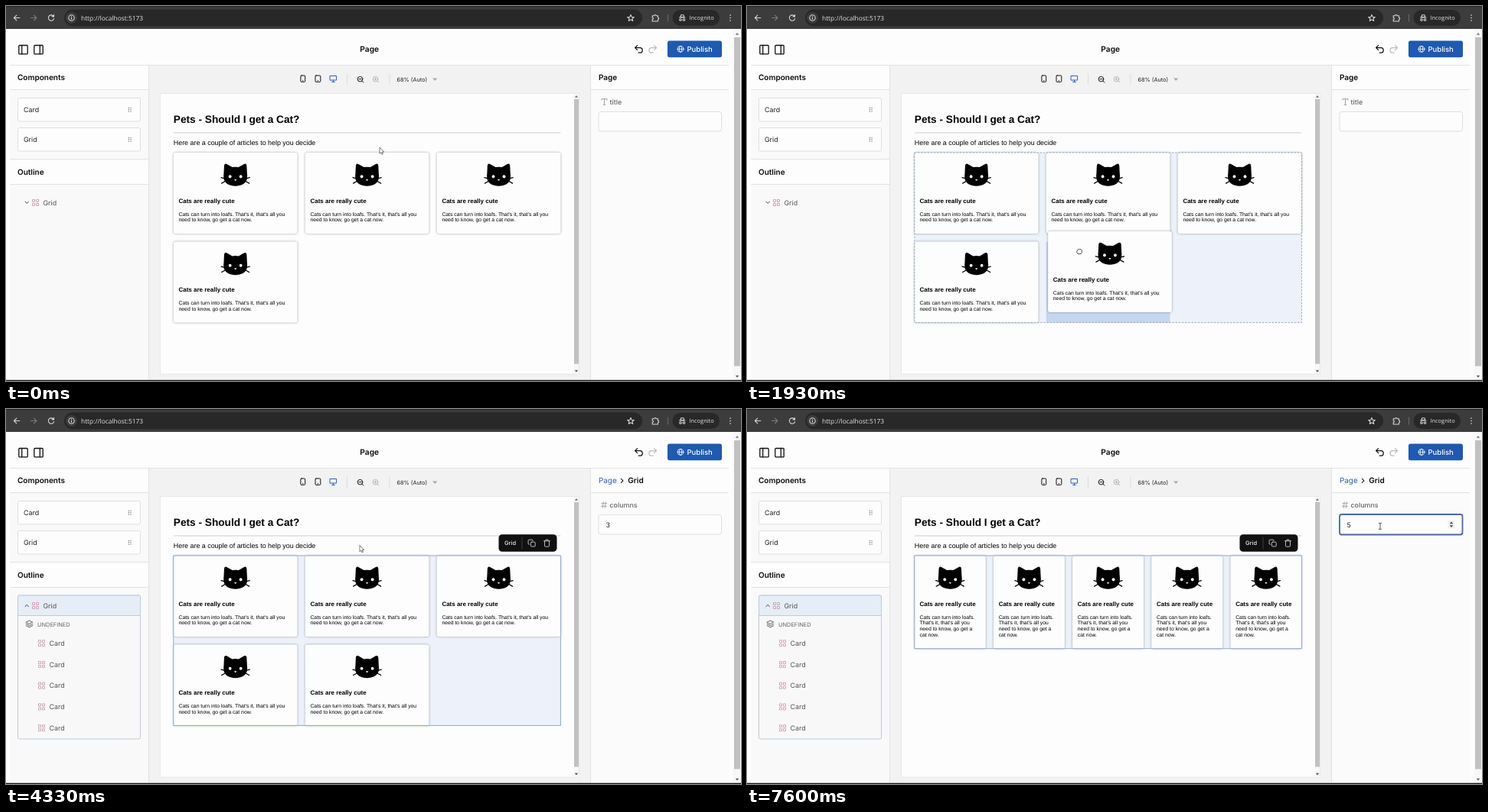
An HTML page for the animation above (7670 ms loop, 960 px wide and 491 px high).

```html
<!DOCTYPE html>
<html lang="en">
<head>
<meta charset="utf-8">
<title>Page editor</title>
<style>
html, body { margin: 0; width: 100%; height: 100%; overflow: hidden; background: #fdfdfd; }
svg { display: block; width: 960px; height: 491px; text-rendering: geometricPrecision; font-family: Inter, sans-serif; }
text { white-space: pre; }
.chrome { font-family: "Open Sans", sans-serif; fill: #e3e3e3; }
.head { font-size: 10px; font-weight: 600; fill: #0a0a0a; }
.item { font-size: 8.9px; fill: #222; }
.dim { fill: #555; }
.label { font-size: 8.9px; font-weight: 500; fill: #666; }
.page { font-family: "Liberation Sans", Arial, sans-serif; fill: #000; }
.h1 { font-size: 13.66px; font-weight: 700; }
.h3 { font-size: 7.99px; font-weight: 700; }
.body { font-size: 8.88px; }
.p { font-size: 6.83px; }
.box { fill: #fdfdfd; stroke: #dedede; }
.card { fill: #fdfdfd; filter: drop-shadow(0 0 1.6px rgba(0,0,0,.36)); }
.line { fill: none; stroke: #111; stroke-width: 1.2; stroke-linecap: round; stroke-linejoin: round; }
.cursor { fill: #fff; stroke: #555; stroke-width: .8; stroke-linejoin: round; }
</style>
</head>
<body>
<svg viewBox="0 0 960 491">
  <defs>
    <clipPath id="view"><rect x="202" y="115" width="540" height="367"/></clipPath>
    <g id="cat">
      <path d="M-14.7-12.4Q-14.2-15.6-11.3-14.4L-4.2-10.3Q0-11 4.2-10.3L11.3-14.4Q14.2-15.6 14.7-12.4L15.2-2Q15.7 1 15.3 4.2C14.4 11 7.5 14.4 0 14.4S-14.4 11-15.3 4.2Q-15.7 1-15.2-2Z"/>
      <path d="M-13 4.8L-18.6 3.4M-13 8L-18 10.8M13 4.8L18.6 3.4M13 8L18 10.8" stroke="#000" stroke-width="1.3" stroke-linecap="round"/>
      <ellipse cx="-7" cy="2" rx="1.9" ry="2.1" fill="#fdfdfd"/>
      <ellipse cx="7" cy="2" rx="1.9" ry="2.1" fill="#fdfdfd"/>
      <path d="M-1.7 5.6H1.7L0 7.7Z" fill="#fdfdfd"/>
    </g>
    <path id="tiles" d="M-4-4h3v3h-3zM1-4h3v3h-3zM-4 1h3v3h-3zM1 1h3v3h-3z" fill="none" stroke="#cf9fae" stroke-width=".9"/>
    <path id="dots" d="M-1.3-2.4v0M1.3-2.4v0M-1.3 0v0M1.3 0v0M-1.3 2.4v0M1.3 2.4v0" stroke="#555" stroke-width="1.3" stroke-linecap="round"/>
    <path id="up" d="M-2.2 1.2L0-1.4 2.2 1.2Z"/>
    <path id="down" d="M-2.2-1.2L0 1.4 2.2-1.2Z"/>
  </defs>

  <!-- browser bar -->
  <rect width="960" height="30" fill="#3c3c3c"/>
  <rect width="960" height="1" fill="#242424"/>
  <rect x="76" y="4.5" width="755" height="22" rx="11" fill="#282828"/>
  <rect x="870.5" y="5" width="61.5" height="21" rx="10.5" fill="#282828"/>
  <circle cx="85.5" cy="15.5" r="7.5" fill="#3c3c3c"/>
  <g class="line" style="stroke:#d6d6d6;stroke-width:1.1">
    <path d="M17.8 15.5h-7.4m3.4-3.4l-3.4 3.4 3.4 3.4"/>
    <path d="M32.5 15.5h7.4m-3.4-3.4l3.4 3.4-3.4 3.4" stroke="#7a7a7a"/>
    <path d="M62.2 13.6A3.7 3.7 0 1 0 62.6 16.6M62.5 11.5v2.4h-2.4"/>
    <circle cx="85.5" cy="15.5" r="3.7"/><path d="M85.5 15.3v2M85.5 13.6v.1"/>
    <path d="M816 11.4l1.2 2.8 3.1.3-2.4 2 .8 3-2.7-1.6-2.7 1.6.8-3-2.4-2 3.1-.3Z"/>
    <path d="M844.2 12.8h2.4a1.2 1.2 0 0 1 2.5 0h2.4v2.5a1.2 1.2 0 0 1 0 2.4v2.3h-7.3v-2.4a1.2 1.2 0 0 0 0-2.4Z"/>
    <path d="M864.5 11v9" stroke="#666"/>
    <path d="M879.5 15h7.5M880.9 14.6l.7-2.8h3.4l.7 2.8Z"/>
    <circle cx="881" cy="18" r="1.3"/><circle cx="885.5" cy="18" r="1.3"/>
  </g>
  <path d="M946 12v0M946 15.5v0M946 19v0" stroke="#d6d6d6" stroke-width="1.7" stroke-linecap="round"/>
  <text class="chrome" x="98" y="18.7" font-size="8.4">http://localhost:5173</text>
  <text class="chrome" x="892.5" y="18.2" font-size="7.4">Incognito</text>

  <!-- editor shell -->
  <rect y="30" width="960" height="461" fill="#fdfdfd"/>
  <rect x="5" y="110" width="181.500" height="90.500" fill="#f9f9f9"/>
  <rect x="5" y="233.500" width="181.500" height="256" fill="#f9f9f9"/>
  <rect x="186.500" y="77.500" width="577.500" height="412" fill="#f2f2f2"/>
  <rect x="764" y="110" width="180" height="379.500" fill="#fbfbfb"/>
  <path d="M5 77.500H944M5 109.500H186.500M5 200.500H186.500M5 233.500H186.500M764 109.500H944M186.500 77.500V489M763.500 77.500V489" stroke="#e2e2e2"/>
  <rect x="949.500" y="30" width="10.500" height="460" fill="#f8f8f8"/>
  <rect x="951" y="41" width="8" height="430.500" fill="#c1c1c1"/>
  <use href="#up" x="955" y="36.500" fill="#777"/><use href="#down" x="955" y="485" fill="#555"/>
  <rect y="489.700" width="960" height="1.300" fill="#161616"/>

  <g class="line" style="stroke-width:1.300">
    <rect x="16.800" y="51.500" width="11.400" height="11.400" rx="1"/><path d="M20.700 51.500v11.400"/>
    <rect x="36.800" y="51.500" width="11.400" height="11.400" rx="1"/><path d="M44.300 51.500v11.400"/>
    <path d="M824.600 51.600l-3 3 3 3M822 54.600h5.900a3.300 3.300 0 0 1 0 6.600h-1.700"/>
    <path d="M846.600 51.600l3 3-3 3M849.200 54.600h-5.900a3.300 3.300 0 0 0 0 6.600h1.700" stroke="#bbb"/>
  </g>
  <text class="head" x="474.700" y="59.800" text-anchor="middle" style="font-size:10.200px">Page</text>
  <rect x="864" y="45.500" width="71" height="21.800" rx="2.700" fill="#1f59b0"/>
  <g class="line" style="stroke:#fff;stroke-width:.8">
    <circle cx="881" cy="56.400" r="4"/><ellipse cx="881" cy="56.400" rx="1.700" ry="4"/><path d="M877 56.400h8"/>
  </g>
  <text x="889.500" y="59.800" font-size="9.500" font-weight="500" fill="#fff">Publish</text>

  <text class="head" x="15" y="97.200">Components</text>
  <text class="head" x="15" y="220.700">Outline</text>
  <rect class="box" x="15.500" y="120.500" width="160" height="30.500" rx="2"/>
  <rect class="box" x="15.500" y="159.500" width="160" height="30.500" rx="2"/>
  <text class="item" x="23" y="139">Card</text><use href="#dots" x="161.700" y="135.700"/>
  <text class="item" x="23" y="178">Grid</text><use href="#dots" x="161.700" y="174.700"/>

  <!-- viewport controls -->
  <g class="line" style="stroke-width:1">
    <rect x="384.900" y="91" width="5.800" height="8.400" rx="1"/><path d="M387.500 97.700h.6"/>
    <rect x="404" y="91" width="6.800" height="8.400" rx="1"/><path d="M407.100 97.700h.6"/>
    <path d="M423.400 91.500h8.200v5.600h-8.200zM427.500 97.200v2.200M425.600 99.500h3.800" stroke="#2a62b8"/>
    <circle cx="462.500" cy="95.700" r="3.300"/><path d="M465 98.200l1.900 1.900M461 95.700h3"/>
    <g stroke="#b5b5b5"><circle cx="482.500" cy="95.700" r="3.300"/><path d="M485 98.200l1.900 1.900M481 95.700h3M482.500 94.200v3"/></g>
    <path d="M445.500 89v14M501 89v14" stroke="#dcdcdc"/>
  </g>
  <text x="510.500" y="98.700" font-size="7.300" fill="#222">68% (Auto)</text>
  <path d="M557 94.600h6.400l-3.200 3.400Z" fill="#aaa"/>

  <!-- preview page -->
  <rect x="201.500" y="114.500" width="547" height="367.500" fill="#fdfdfd" stroke="#e8e8e8"/>
  <rect x="742" y="115" width="6" height="367" fill="#f7f7f7"/>
  <rect id="thumb" x="742" y="122" width="6" height="346.500" fill="#c1c1c1"/>
  <use href="#up" x="745" y="118.500" fill="#777"/><use href="#down" x="745" y="478" fill="#555"/>
  <text class="page h1" x="218.800" y="153.400">Pets - Should I get a Cat?</text>
  <path d="M219 166H724.400" stroke="#cdcdcd"/>
  <text class="page body" x="218.800" y="182">Here are a couple of articles to help you decide</text>

  <g id="outline"></g>
  <g id="fields"></g>
  <g clip-path="url(#view)"><g id="grid"></g></g>
  <g id="bar">
    <rect x="643.500" y="164.300" width="76" height="22.500" rx="4.500" fill="#111"/>
    <text x="651" y="178.300" font-size="7.500" font-weight="500" fill="#eee">Grid</text>
    <g class="line" style="stroke:#ccc;stroke-width:.9">
      <path d="M674 168v15" stroke="#444"/>
      <rect x="685.400" y="174.200" width="5.800" height="5.800" rx="1"/>
      <path d="M683.500 177.200h-.4a1 1 0 0 1-1-1v-4a1 1 0 0 1 1-1h4a1 1 0 0 1 1 1v.4"/>
      <path d="M702.400 172.800h8.200M703.500 172.800v6.400a1 1 0 0 0 1 1h4a1 1 0 0 0 1-1v-6.400M705 172.600v-1.500h3v1.500"/>
    </g>
  </g>
  <g id="drag">
    <g id="small">
      <rect class="box" x=".5" y=".5" width="160" height="30.500" rx="2"/>
      <text class="item" x="8" y="19">Card</text><use href="#dots" x="146.700" y="15.700"/>
    </g>
    <g id="wide">
      <rect x=".5" y=".5" width="504.500" height="21" rx="1" fill="#fdfdfd" stroke="#cdd8e4"/>
      <text x="5" y="13.200" font-size="6.100" fill="#222">__preview</text>
      <use href="#dots" transform="translate(495 10.800) scale(.65)"/>
    </g>
    <g id="held"></g>
  </g>
  <g id="pointer">
    <path id="arrow" class="cursor" d="M0 0V8.300L1.900 6.600 3.100 9.400 4.400 8.800 3.200 6.100H5.700Z"/>
    <path id="open" class="cursor" style="stroke:#222" d="M-2.300 4.700L-4.200 1.300Q-4.500 0-3.300.2L-2.300 1.300-3-2.600Q-2.600-3.900-1.700-2.900L-1-.5-1.100-3.800Q-.4-5 .3-3.800L.5-.6 1.100-3.400Q1.900-4.300 2.300-3.100L2 0 2.700-1.700Q3.700-2.300 3.800-1L3.100 2.600 2.500 4.700Z"/>
    <path id="closed" class="cursor" style="stroke:#222" d="M-1.900 3.500L-3.300 1.300Q-3.700-.2-2.700-.4V-1.700Q-1.900-3-.9-2.300 0-3.200.9-2.300 1.900-2.800 2.300-1.800 3.500-1.800 3.300-.3L3 1.900 2.100 3.500Z"/>
    <path id="beam" class="line" style="stroke:#333;stroke-width:.8" d="M-1.700-4.300Q0-4.300 0-3.300 0-4.300 1.700-4.300M0-3.300V3.300M-1.700 4.300Q0 4.300 0 3.300 0 4.300 1.700 4.300"/>
  </g>
</svg>
<script>
const LOOP = 7670, X = 218.8, Y = 192, W = 505.6, GAP = 10.24, LEADING = 7.85;
const words = "Cats can turn into loafs. That's it, that's all you need to know, go get a cat now.".split(" ");
const breaks = { 2: [17], 3: [10], 4: [7, 15], 5: [5, 10, 16] };

// pointer path: time, x, y
const path = [
  [70, 488, 185], [560, 83, 142], [680, 83, 142], [1400, 416, 284], [1600, 420, 290], [1730, 420, 290],
  [2100, 445, 345], [2470, 446, 352], [2530, 446, 352], [2800, 429, 315], [3270, 359, 258],
  [3640, 359, 258], [4130, 462, 178.5], [4400, 462, 178.5], [4930, 827, 153.5]
];
const shapes = [[0, "arrow"], [500, "open"], [620, "closed"], [3400, "open"], [3780, "arrow"], [4880, "beam"]];
const columns = [[0, 3], [5400, 2], [5800, 3], [6200, 4], [6800, 5]];
const ENTER = 950, INSERT = 1800, SWAP = 3000, DROP = 3400, SETTLE = 260, SELECT = 4200, FOCUS = 5070;

const el = id => document.getElementById(id);
const show = (id, on) => { el(id).style.display = on ? "" : "none"; };
const move = (id, x, y) => el(id).setAttribute("transform", `translate(${x} ${y})`);
const at = (steps, t) => steps.filter(s => s[0] <= t).pop()[1];

function pointer(t) {
  const i = path.findIndex(k => k[0] > t);
  if (i === 0) return path[0].slice(1);
  if (i < 0) return path[path.length - 1].slice(1);
  const [t0, x0, y0] = path[i - 1], [t1, x1, y1] = path[i];
  const p = (t - t0) / (t1 - t0), e = p * p * (3 - 2 * p);
  return [x0 + (x1 - x0) * e, y0 + (y1 - y0) * e];
}

const cardWidth = n => (W - GAP * (n - 1)) / n;
const cardHeight = n => 90.3 + LEADING * (breaks[n].length + 1);
const slot = (i, n) => [
  X + (i % n) * (cardWidth(n) + GAP),
  Y + Math.floor(i / n) * (cardHeight(n) + GAP + .2)
];

function card(x, y, n) {
  const w = cardWidth(n), cuts = [0, ...breaks[n], words.length];
  const lines = cuts.slice(1).map((end, i) =>
    `<text class="page p" x="6.7" y="${82.5 + i * LEADING}">${words.slice(cuts[i], end).join(" ")}</text>`);
  return `<g transform="translate(${x} ${y})">
    <rect class="card" width="${w}" height="${cardHeight(n)}" rx="2.7"/>
    <use href="#cat" x="${w / 2}" y="29.3"/>
    <text class="page h3" x="6.7" y="66">Cats are really cute</text>${lines.join("")}</g>`;
}

function drawGrid({ n, count, hole, shifted, dashed, selected }) {
  const h = slot(count - 1, n)[1] - Y + cardHeight(n), dy = shifted ? 21.5 : 0;
  const frame = style => `<rect x="${X}" y="${Y}" width="${W}" height="${h}" ${style}/>`;
  let s = dashed || selected ? frame('fill="#edf2fa"') : "";
  for (let i = 0; i < count; i++) {
    const [x, y] = slot(i, n);
    s += i === hole
      ? `<rect x="${x}" y="${y}" width="${cardWidth(n)}" height="${cardHeight(n)}" rx="2" fill="#c5d7ee"/>`
      : card(x, y, n);
  }
  if (dashed) s += frame('fill="none" stroke="#8da3bd" stroke-dasharray="2.6 1.6" stroke-width=".9"');
  if (selected) s += frame('fill="none" stroke="#8caad4"');
  el("grid").innerHTML = (shifted ? `<rect x="${X}" y="${Y}" width="${W}" height="21.5" fill="#cfdcee"/>` : "") +
    `<g transform="translate(0 ${dy})">${s}</g>`;
  el("thumb").setAttribute("height", n === 2 ? 299.5 : 346.5);
}

function drawOutline(open) {
  let s = "";
  if (open) {
    s = `<rect x="15.500" y="244" width="160" height="188" rx="2" fill="#f8f8f8" stroke="#c3c9d2"/>
      <path d="M15.500 270.500V246q0-2 2-2h156q2 0 2 2v24.500Z" fill="#e5edf7" stroke="#bccbde"/>
      <path class="line" style="stroke:#555;stroke-width:.9" d="M26.200 279.200l4.300-2.200 4.300 2.200-4.300 2.200ZM26.200 281.600l4.300 2.200 4.300-2.200M26.200 283.700l4.300 2.200 4.300-2.200"/>
      <text x="41" y="284.500" font-size="7.400" fill="#666">UNDEFINED</text>`;
    for (let i = 0; i < 5; i++) {
      const y = 306.7 + i * 27.75;
      s += `<use href="#tiles" x="46.500" y="${y}"/><text class="item dim" x="56.500" y="${y + 3.2}">Card</text>`;
    }
  }
  el("outline").innerHTML = s + `<path class="line" style="stroke:#444;stroke-width:1" d="${open ? "M25 258.500l2.200-2 2.200 2" : "M25 256.300l2.200 2 2.200-2"}"/>
    <use href="#tiles" x="38.500" y="257.500"/><text class="item dim" x="48.500" y="260.700">Grid</text>`;
}

function drawFields({ n, selected, focus }) {
  const ring = focus
    ? '<rect x="774" y="138" width="160.500" height="26.500" rx="2.700" fill="#fdfdfd" stroke="#4668a3" stroke-width="1.800"/>'
    : '<rect class="box" x="774" y="138.500" width="160.500" height="25.500" rx="2.700"/>';
  const spin = `<rect x="915.500" y="146" width="9" height="10.500" fill="#efefef"/>
    <use href="#up" x="920" y="149" fill="#444"/><use href="#down" x="920" y="153.500" fill="#444"/>`;
  el("fields").innerHTML = ring + (selected
    ? `<text x="774" y="97.200" font-size="9.900" fill="#2a5fb3">Page</text>
      <path class="line" style="stroke:#222" d="M803.400 91.400l2.500 2.500-2.500 2.500"/>
      <text class="head" x="812.300" y="97.200">Grid</text>
      <path class="line" style="stroke:#999;stroke-width:.8" d="M777.700 123.700h7.200M777.300 127.300h7.200M780.200 121.500l-1 8M783.300 121.500l-1 8"/>
      <text class="label" x="788.500" y="128.700">columns</text>
      <text class="item" x="783.500" y="154.700">${n}</text>` + (focus ? spin : "")
    : `<text class="head" x="774" y="97.200">Page</text>
      <path class="line" style="stroke:#999;stroke-width:.9" d="M778 123.200v-1.500h7v1.500M781.500 121.700v7.600M780.200 129.300h2.600"/>
      <text class="label" x="788.500" y="128.700">title</text>`);
}

let lastKey = "";
function render(t) {
  const [px, py] = pointer(t), n = at(columns, t);
  const held = t >= INSERT && t < DROP + SETTLE, selected = t >= SELECT;
  const state = {
    n, selected,
    count: t < INSERT ? 4 : 5,
    hole: held ? (t < SWAP ? 4 : 1) : -1,
    shifted: t >= ENTER && t < INSERT,
    dashed: t >= ENTER && t < DROP + SETTLE,
    focus: t >= FOCUS
  };
  const key = JSON.stringify(state);
  if (key !== lastKey) {
    lastKey = key;
    drawGrid(state);
    drawOutline(selected);
    drawFields(state);
    show("bar", selected);
  }

  const small = t >= 650 && t < ENTER;
  show("small", small);
  show("wide", state.shifted);
  show("held", held);
  if (small) move("drag", px - 68, py - 22);
  else if (state.shifted) move("drag", px - 212.500, py - 16);
  else if (held) {
    const left = t < DROP ? 1 : (1 - (t - DROP) / SETTLE) ** 3;
    const [sx, sy] = slot(1, 3), x = px - 41, y = py - 26;
    move("drag", sx + (x - sx) * left, sy + (y - sy) * left);
  }

  const shape = at(shapes, t);
  for (const [, id] of shapes) show(id, id === shape);
  move("pointer", px, py);
}

el("held").innerHTML = card(0, 0, 3);
const start = performance.now();
function tick() {
  render((performance.now() - start) % LOOP);
  requestAnimationFrame(tick);
}
render(0);
requestAnimationFrame(tick);
</script>
</body>
</html>
```
